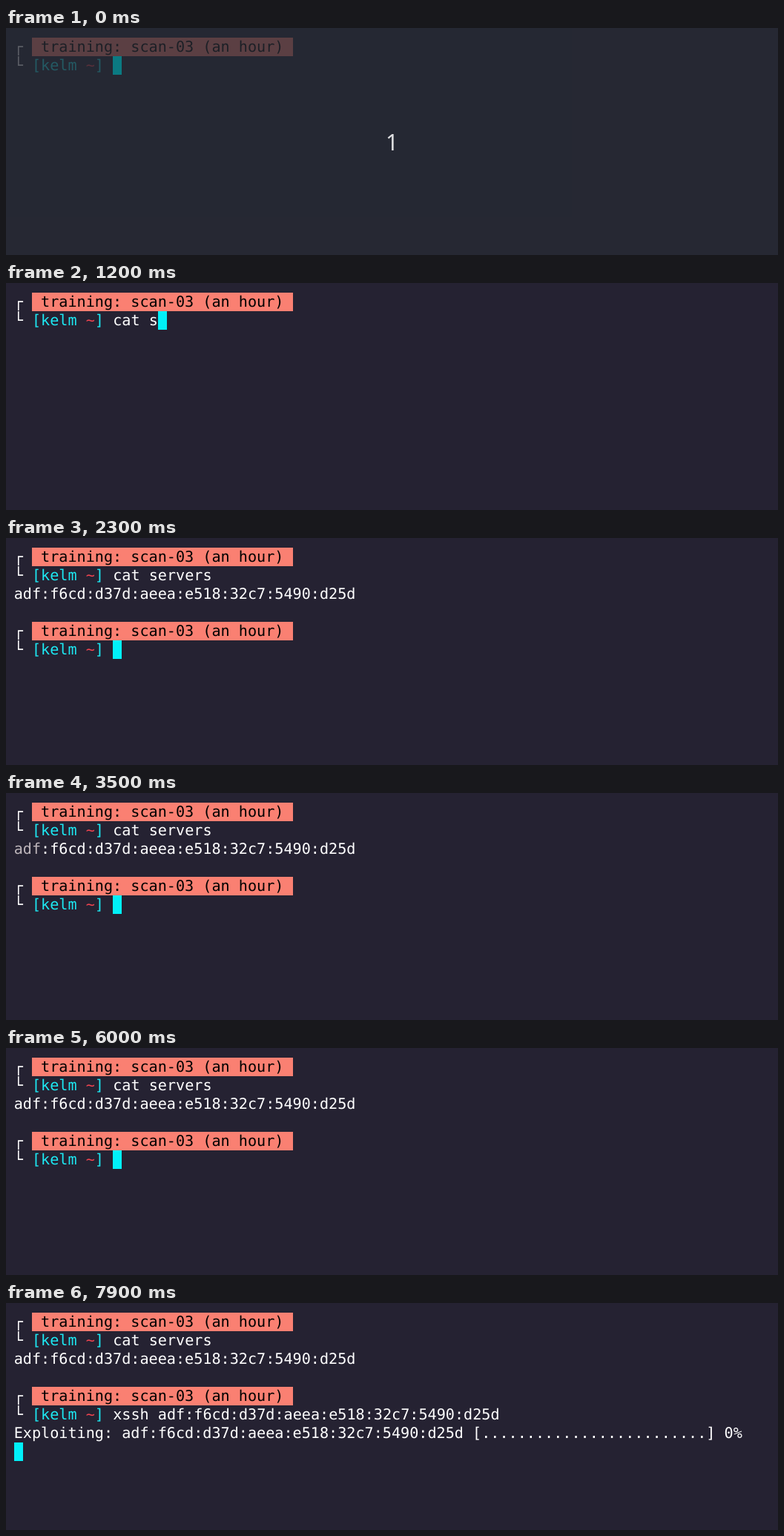
Animation, 1041 px wide and 306 px high, one loop 8000 ms. Source, as an HTML page:

```html
<!DOCTYPE html>
<html lang="en">
<head>
<meta charset="utf-8">
<title>Terminal session</title>
<style>
  html, body { margin: 0; width: 100%; height: 100%; overflow: hidden; background: #252232; }
  #screen {
    position: absolute; left: 10.7px; top: 13px; margin: 0; color: #fff; white-space: pre;
    font: 20.15px/25px "DejaVu Sans Mono", monospace; text-rendering: geometricPrecision;
  }
  .line { height: 25px; }
  .title, .cursor { display: inline-block; height: 25px; vertical-align: top; }
  .title { background: #fa8072; color: #000; }
  .cursor { background: #00f0f8; }
  .user { color: #1de8f2; }
  .path { color: #f04450; }
  .selected { color: #bdb5ba; }
  #countdown {
    position: absolute; inset: 0; display: flex; align-items: center; justify-content: center;
    background: rgba(38, 42, 51, .75); color: #dedee0; font: 30px "Noto Sans", sans-serif;
  }
  .waiting .cursor { position: relative; z-index: 1; background: #0b7a82; }
  .waiting #screen { z-index: auto; }
</style>
</head>
<body>
<div id="screen"></div>
<div id="countdown">1</div>
<script>
const DURATION = 8000;
const address = "adf:f6cd:d37d:aeea:e518:32c7:5490:d25d";
const commands = ["cat servers", "xssh " + address];

// [time in ms, characters typed]
const typing = [
  [[600, 1], [800, 2], [900, 3], [1200, 5], [1400, 7], [1600, 8], [1700, 10], [1800, 11]],
  [[6200, 2], [6400, 3], [6500, 4], [6700, 5], [7100, 43]]
];

const screen = document.getElementById("screen");
const countdown = document.getElementById("countdown");

const span = (name, text) => `<span class="${name}">${text}</span>`;
const cursor = span("cursor", " ");
const title = "┌ " + span("title", " training: scan-03 (an hour) ");
const prompt = "└ " + span("user", "[kelm ") + span("path", "~") + span("user", "]") + " ";

function typed(index, t) {
  const step = typing[index].filter(([time]) => time <= t).pop();
  return commands[index].slice(0, step ? step[1] : 0);
}

function selectedCount(t) {
  if (t < 3500 || t >= 6000) return 0;
  const p = Math.max(0, Math.min(1, (Math.floor(t / 100) - 37) / 6));
  return Math.round(3 + (address.length - 3) * p * p * (3 - 2 * p));
}

function linesAt(t) {
  const lines = [title, prompt + typed(0, t) + (t < 2300 ? cursor : "")];
  if (t >= 2300) {
    const n = selectedCount(t);
    lines.push(span("selected", address.slice(0, n)) + address.slice(n), "",
      title, prompt + typed(1, t) + (t < 7800 ? cursor : ""));
  }
  if (t >= 7900) lines.push(`Exploiting: ${address} [${".".repeat(25)}] 0%`);
  if (t >= 7800) lines.push(cursor);
  return lines;
}

let shown = "";
function render(now) {
  const t = now % DURATION;
  const waiting = t < 100;
  const html = linesAt(t).map(line => `<div class="line">${line}</div>`).join("");
  if (html !== shown) screen.innerHTML = shown = html;
  document.body.className = waiting ? "waiting" : "";
  countdown.style.display = waiting ? "flex" : "none";
}

const start = performance.now();
function tick() {
  render(performance.now() - start);
  requestAnimationFrame(tick);
}
render(0);
requestAnimationFrame(tick);
</script>
</body>
</html>
```
